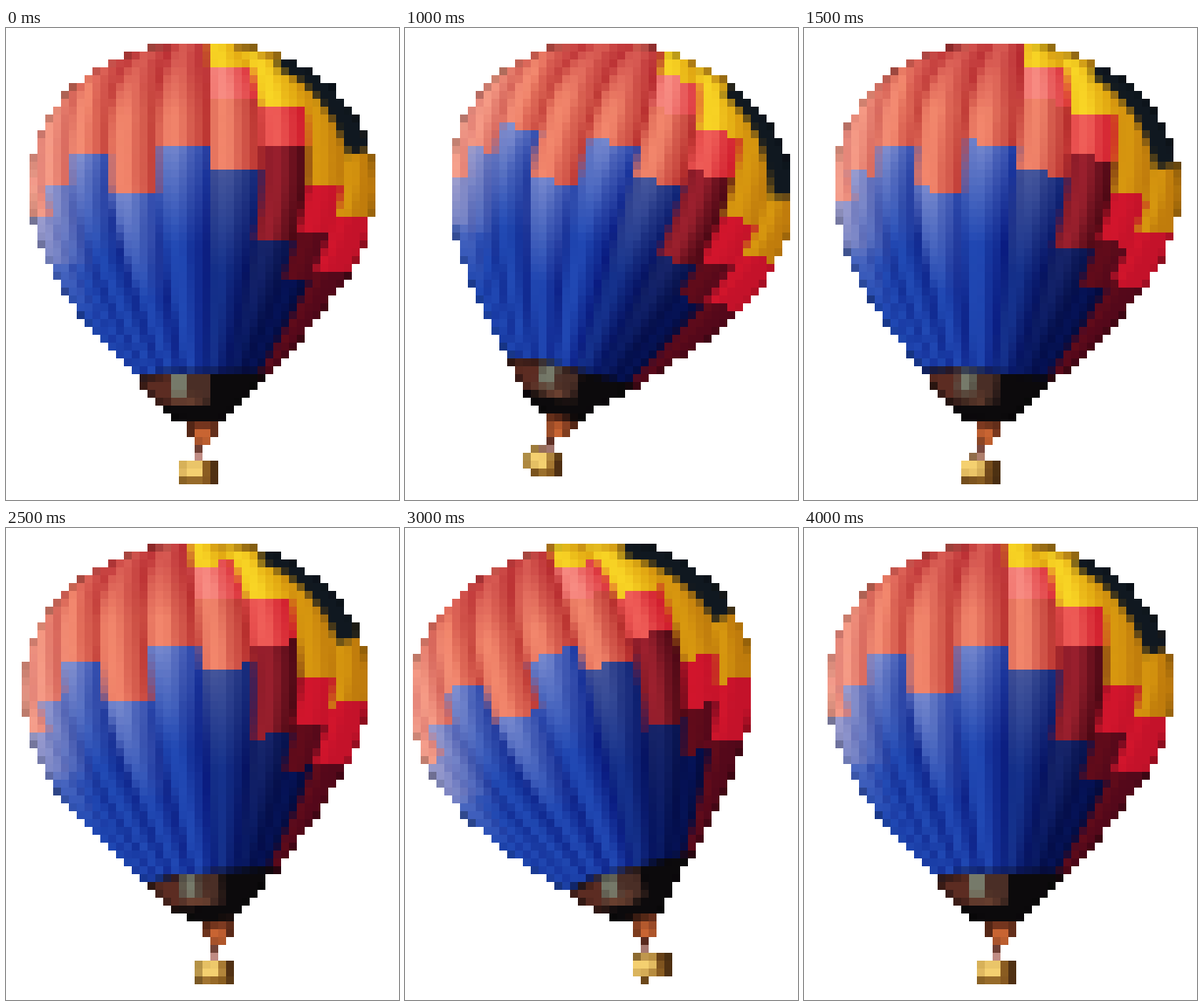
An HTML page with a canvas for the animation above (4.5 s loop, 500x600 px).

```html
<!DOCTYPE html>
<html lang="en">
<head>
<meta charset="utf-8">
<title>Swaying balloon</title>
<style>
html, body { margin: 0; width: 100%; height: 100%; overflow: hidden; background: #fff; }
canvas { display: block; width: 500px; height: 600px; image-rendering: pixelated; }
</style>
</head>
<body>
<canvas id="stage" width="50" height="60"></canvas>
<script>
const STEP = 500, FLOOR = 450, STRIPS = 6;
const SWAY = [0, 5, 15, 5, 0, -5, -15, -5, 0];
const ctx = document.getElementById('stage').getContext('2d', { willReadFrequently: true });

// Each cloth runs from its lit side to its shaded side.
const CLOTH = {
  coral: ['#fa9274', '#b8302e'],
  blush: ['#fb988c', '#dc343c'],
  scarlet: ['#f4685e', '#d01c2c'],
  wine: ['#a82432', '#4c0814'],
  maroon: ['#640c1a', '#54081a'],
  crimson: ['#d4162c', '#c4122a'],
  yellow: ['#fcdc28', '#e0a410'],
  gold: ['#dc9c10', '#c07c0c'],
  sky: ['#8494d4', '#1c3aa4'],
  cobalt: ['#2450bc', '#08187c'],
  night: ['#06145c', '#020a3c']
};

// Gores from left to right: cloth and the height where it ends; blue fills the rest.
const GORES = [
  'coral 240', 'coral 200', 'coral 160', 'coral 213', 'coral 148',
  'yellow 48 blush 90 coral 180',
  'yellow 100 scarlet 155 wine 272',
  'gold 200 crimson 262 maroon 316',
  'gold 240 crimson 312 maroon 450'
];

const lerp = (a, b, t) => a + (b - a) * t;
const clamp = t => Math.max(0, Math.min(1, t));
const rgb = hex => [1, 3, 5].map(i => parseInt(hex.slice(i, i + 2), 16));
const mix = (a, b, t) => a.map((v, i) => lerp(v, b[i], t));
const css = color => `rgb(${color.map(Math.round)})`;
const tint = (name, shade) => mix(...CLOTH[name].map(rgb), shade);

// A meridian of the envelope, seen from the side.
function meridianX(edge, y) {
  const angle = (2.5 + 17.5 * (edge - 5)) * Math.PI / 180;
  const halfWidth = y < 190
    ? lerp(220, 130, ((190 - y) / 170) ** 4)
    : lerp(220, 85, ((y - 190) / 255) ** 1.4);
  return 250 + halfWidth * Math.sin(angle);
}

function shape(color, points) {
  ctx.fillStyle = color;
  ctx.beginPath();
  points.forEach(([x, y]) => ctx.lineTo(x, y));
  ctx.fill();
}

function box(color, x, y, w, h) {
  ctx.fillStyle = color;
  ctx.fillRect(x, y, w, h);
}

function fade(x0, y0, x1, y1, color) {
  const fill = ctx.createLinearGradient(x0, y0, x1, y1);
  fill.addColorStop(0, `rgba(${color}, 0.36)`);
  fill.addColorStop(1, `rgba(${color}, 0)`);
  return fill;
}

function gorePaint(gore, shade) {
  const paint = ctx.createLinearGradient(0, 0, 0, FLOOR);
  const stop = (y, color) => paint.addColorStop(clamp(y / FLOOR), css(color));
  let y = 0;
  for (const [, name, end] of GORES[gore].matchAll(/(\w+) (\d+)/g)) {
    stop(y, tint(name, shade));
    stop(y = +end, tint(name, shade));
  }
  const dusk = clamp((gore - 4) * 0.42);
  const blue = name => mix(tint(name, shade), tint('night', shade), dusk);
  stop(y, blue('sky'));
  stop(y + 130, blue('cobalt'));
  return paint;
}

// Every strip reaches the right side, where the next one covers it.
function drawGores() {
  for (let strip = 0; strip < GORES.length * STRIPS; strip++) {
    const gore = Math.floor(strip / STRIPS), part = strip % STRIPS;
    const across = (part + 0.5) / STRIPS;
    const contrast = 0.55 + gore * 0.09;
    const shade = clamp(Math.abs(across - 0.28) / 0.66 * contrast + part % 2 * 0.08);
    const points = [[500, FLOOR], [500, 0]];
    for (let y = 0; y <= FLOOR; y += 15) {
      points.push([strip ? meridianX(strip / STRIPS, y) : 0, y]);
    }
    shape(gorePaint(gore, shade), points);
  }
}

function drawEnvelope() {
  drawGores();
  box(fade(0, 40, 0, 110, '170, 16, 40'), 110, 0, 148, 110);
  box(fade(30, 0, 110, 0, '255, 215, 210'), 0, 0, 110, 300);
  shape('#b98418', [[290, 15], [340, 15], [355, 44], [310, 29], [290, 29]]);

  ctx.strokeStyle = '#101820';
  ctx.lineWidth = 32;
  ctx.beginPath();
  ctx.moveTo(350, 36);
  ctx.quadraticCurveTo(425, 70, 452, 158);
  ctx.stroke();

  ctx.globalCompositeOperation = 'destination-in';
  ctx.beginPath();
  ctx.moveTo(250, 18);
  ctx.bezierCurveTo(385, 18, 470, 100, 470, 200);
  ctx.bezierCurveTo(470, 290, 406, 360, 333, 442);
  ctx.lineTo(165, 442);
  ctx.bezierCurveTo(90, 370, 30, 290, 30, 200);
  ctx.bezierCurveTo(30, 100, 115, 18, 250, 18);
  ctx.fill();
  ctx.globalCompositeOperation = 'source-over';
}

function drawMouth() {
  shape('#0c0a0c', [[166, 446], [200, 438], [334, 438], [282, 492], [272, 502], [222, 500], [200, 484]]);
  shape('#5c2c22', [[168, 448], [212, 440], [212, 478], [196, 478]]);
  box('#4a2e26', 228, 440, 32, 38);
  box('#767a6a', 210, 440, 20, 30);
  box('#6a4030', 210, 468, 36, 11);
}

function drawBasket() {
  box('#70341e', 234, 501, 35, 18);
  box('#c86432', 240, 509, 20, 20);
  box('#5a2c20', 239, 528, 12, 13);
  box('#c08c84', 238, 538, 12, 13);
  box('#946424', 222, 550, 45, 29);
  box('#f4d070', 222, 551, 28, 20);
  box('#402410', 259, 550, 8, 29);
}

// Soft edge cells become solid and darker; faint ones vanish.
function hardenEdges(image) {
  const { data } = image;
  for (let i = 0; i < data.length; i += 4) {
    const alpha = data[i + 3];
    for (let c = 0; c < 3; c++) data[i + c] *= (alpha + 255) / 510;
    data[i + 3] = alpha > 110 ? 255 : 0;
  }
  return image;
}

function renderPose(degrees) {
  ctx.clearRect(0, 0, 50, 60);
  ctx.save();
  ctx.beginPath();
  ctx.rect(0, 2, 50, 56);
  ctx.clip();
  ctx.scale(0.1, 0.1);
  ctx.translate(250, 300);
  ctx.rotate(degrees * Math.PI / 180);
  ctx.translate(-250, -300);
  drawEnvelope();
  drawMouth();
  drawBasket();
  ctx.restore();
  return hardenEdges(ctx.getImageData(0, 0, 50, 60));
}

const poses = new Map(SWAY.map(angle => [angle, renderPose(angle)]));
const begin = performance.now();

function tick() {
  const step = Math.floor((performance.now() - begin) / STEP) % SWAY.length;
  ctx.putImageData(poses.get(SWAY[step]), 0, 0);
  requestAnimationFrame(tick);
}
tick();
</script>
</body>
</html>
```
